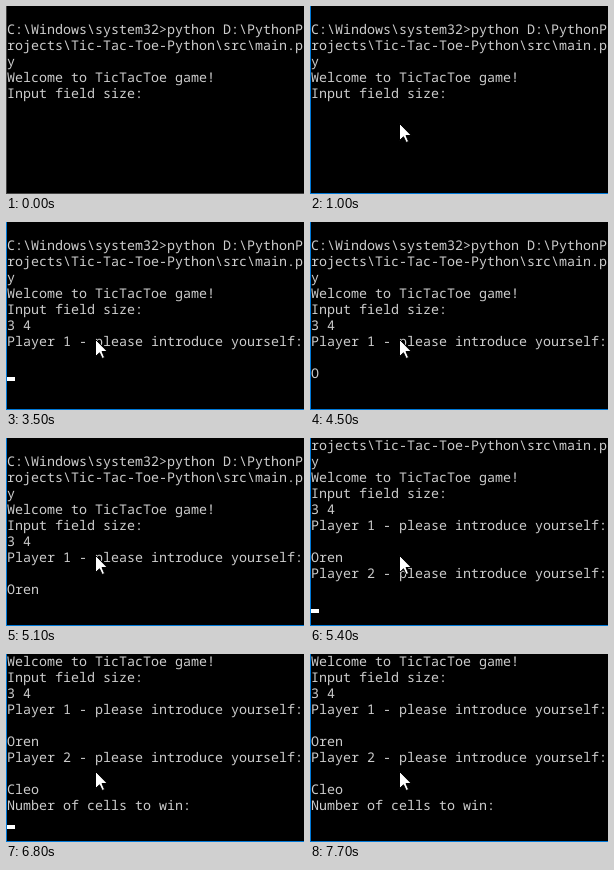
These frames come from a looping animation (298 px wide and 188 px high, 8 s). An HTML page:

```html
<!DOCTYPE html>
<html lang="en">
<head>
<meta charset="utf-8">
<title>Console game</title>
<style>
  html, body { margin: 0; width: 100%; height: 100%; overflow: hidden; background: #000; }
  #stage { position: relative; width: 298px; height: 188px; overflow: hidden; background: #000; }
  #log {
    position: absolute; left: 1px; top: 15px; margin: 0;
    font: 13.3333px/16px "Noto Sans Mono", "DejaVu Sans Mono", monospace;
    text-rendering: geometricPrecision;
    color: #ccc;
  }
  #caret { position: absolute; width: 8px; height: 4px; background: #fff; }
  #edge {
    position: absolute; inset: 0; box-sizing: border-box;
    border: solid #434343; border-width: 0 0 1px 1px;
  }
  #edge.active { border-color: #0078d7; }
  #mouse { position: absolute; left: 0; top: 0; width: 13px; height: 21px; }
</style>
</head>
<body>
<div id="stage">
  <pre id="log"></pre>
  <div id="caret"></div>
  <div id="edge"></div>
  <svg id="mouse" viewBox="0 0 13 21">
    <path d="M.5 .5V17.5L4.5 13.8L7.2 19.5L9.6 18.5L7 12.5H12.3Z" fill="#fff" stroke="#000"/>
  </svg>
</div>
<script>
  const LOOP = 8000, CELL = 8, ROW = 16, LAST_ROW = 9;
  const LEAD = 40; // covers the delay until a frame is painted
  const [log, caret, edge, mouse] =
    ['log', 'caret', 'edge', 'mouse'].map(id => document.getElementById(id));
  const ask = n => `\nPlayer ${n} - please introduce yourself:\n\n`;
  const intro = [
    'C:\\Windows\\system32>python D:\\PythonP',
    'rojects\\Tic-Tac-Toe-Python\\src\\main.p',
    'y',
    'Welcome to TicTacToe game!',
    'Input field size:',
    ''
  ].join('\n');

  // [time, text added, caret visible]
  const events = [
    [0, intro, 0], [500, '', 1], [1000, '', 0], [1500, '', 1],
    [1800, '3', 1], [1900, ' ', 1], [2000, '4', 1],
    [2500, ask(1), 1], [3000, '', 0], [3500, '', 1], [4000, '', 0],
    [4500, 'O', 0], [4600, '', 1],
    [4800, 'r', 1], [4900, 'e', 1], [5000, 'n', 1], [5100, '', 0],
    [5400, ask(2), 1],
    [5700, 'C', 1], [5800, 'l', 1], [6000, 'e', 1], [6100, 'o', 0], [6600, '', 1],
    [6800, '\nNumber of cells to win:\n', 1], [7700, '', 0]
  ];

  // [time, x, y]
  const path = [[0, 310, 140], [200, 262, 138], [300, 156, 126], [400, 89, 117]];

  function drawText(time) {
    const past = events.filter(e => e[0] <= time);
    const text = past.map(e => e[1]).join('');
    const lines = text.split('\n');
    const row = lines.length - 1;
    const top = 15 - Math.max(0, row - LAST_ROW) * ROW;
    if (log.textContent !== text) log.textContent = text;
    log.style.top = top + 'px';
    caret.style.left = 1 + lines[row].length * CELL + 'px';
    caret.style.top = top + row * ROW + 12 + 'px';
    caret.style.visibility = past.at(-1)[2] ? 'visible' : 'hidden';
  }

  function drawWindow(time) {
    const [, x, y] = path.findLast(p => p[0] <= time);
    mouse.style.transform = `translate(${x}px, ${y}px)`;
    edge.classList.toggle('active', time >= 400);
  }

  const start = performance.now();
  function tick() {
    const time = (performance.now() - start + LEAD) % LOOP;
    drawText(time);
    drawWindow(time);
    requestAnimationFrame(tick);
  }
  tick();
</script>
</body>
</html>
```
